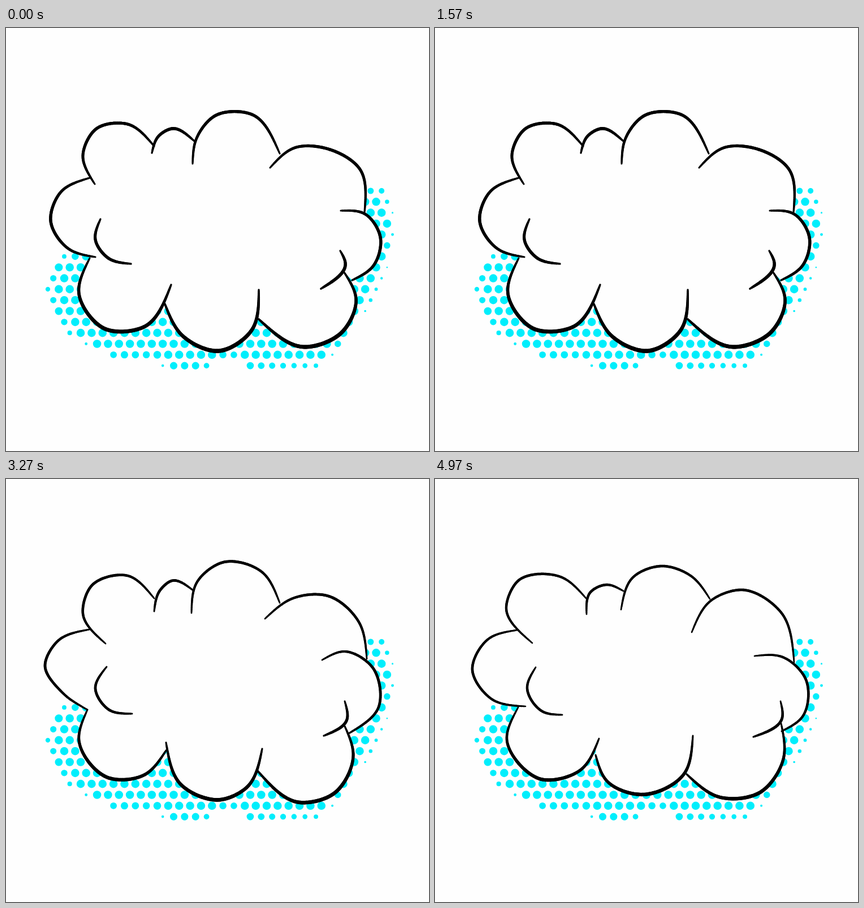
Recreate the animation shown at these times as an HTML page with a canvas. Size 748x748 px, loop 5060 ms.

```html
<!DOCTYPE html>
<html lang="en">
<head>
<meta charset="utf-8">
<title>Comic cloud</title>
<style>
  html, body { margin: 0; width: 100%; height: 100%; overflow: hidden; background: #fefefe; }
  canvas { display: block; width: 100vw; height: 100vh; }
</style>
</head>
<body>
<canvas id="stage" width="748" height="748"></canvas>
<script>
const ctx = document.getElementById('stage').getContext('2d');
const PAPER = '#fefefe', INK = '#000', CYAN = '#00eefc';
const LOOP = 5060, BLOCK = 1300, STEPS = 10;

// Lobes run clockwise from the top left, each through a few key points.
const POSES = [
  {
    pen: 5.4,
    lobes: [
      '157,276 136,225 160,178 215,170 262,209',
      '258,221 270,191 293,178 333,200',
      '330,240 337,195 370,155 435,153 484,222',
      '467,247 510,212 570,214 626,250 634,326',
      '592,323 635,329 662,370 650,420 612,446',
      '598,432 619,480 595,537 528,564 447,515',
      '447,463 434,535 377,571 313,545 281,488',
      '292,454 245,528 175,532 129,470 148,407',
      '158,405 110,390 79,341 97,290 148,265'
    ],
    creases: ['591,394 600,415 557,461', '167,338 158,374 181,407 221,417']
  },
  {
    pen: 4.8,
    lobes: [
      '176,291 136,238 152,188 215,171 262,211',
      '262,234 273,196 293,180 331,197',
      '328,237 338,182 385,147 452,164 484,219',
      '458,247 510,210 570,207 624,253 638,318',
      '559,320 598,305 648,333 659,403 606,450',
      '598,435 614,490 580,556 520,572 444,515',
      '453,477 425,546 380,567 310,541 283,466',
      '283,480 245,523 180,528 129,462 144,408',
      '144,408 100,378 69,330 91,287 148,266'
    ],
    creases: ['599,393 603,425 562,454', '178,332 158,370 182,408 223,415']
  },
  {
    pen: 4.6,
    lobes: [
      '172,290 126,228 147,180 222,173 268,212',
      '268,239 275,200 303,187 333,198',
      '329,231 350,174 400,154 452,171 486,212',
      '454,271 488,215 543,196 612,236 635,324',
      '565,313 615,315 656,355 650,420 613,446',
      '612,432 616,495 575,554 505,563 445,522',
      '456,454 440,522 365,558 304,534 284,488',
      '290,459 258,514 188,531 127,460 147,404',
      '160,402 100,389 66,337 93,284 146,267'
    ],
    creases: ['611,393 614,422 563,456', '178,333 163,370 190,411 225,417']
  }
].map(({ pen, lobes, creases }) => ({ pen, lobes: lobes.map(curve), creases: creases.map(curve) }));

const SHADOW = parsePoints(
  '630,278 670,278 686,320 688,368 676,425 652,481 600,560 556,604 424,609 ' +
  '400,588 375,590 355,609 284,609 262,589 190,590 106,544 82,506 66,462 88,400');

function parsePoints(text) {
  return text.split(' ').map(pair => pair.split(',').map(Number));
}

// Chord-length cubic spline: keeps round lobes round with few points.
function curve(text) {
  const points = parsePoints(text), last = points.length - 1;
  const gaps = points.slice(1).map((p, i) => Math.hypot(p[0] - points[i][0], p[1] - points[i][1]));
  const slope = (i, k) => (points[i + 1][k] - points[i][k]) / gaps[i];
  const tangents = points.map((_, i) => [0, 1].map(k => i > 0 && i < last
    ? (slope(i - 1, k) * gaps[i] + slope(i, k) * gaps[i - 1]) / (gaps[i - 1] + gaps[i]) : 0));
  for (const k of [0, 1]) {
    tangents[0][k] = 1.5 * slope(0, k) - 0.5 * tangents[1][k];
    tangents[last][k] = 1.5 * slope(last - 1, k) - 0.5 * tangents[last - 1][k];
  }
  const path = [points[0]];
  for (let i = 0; i < last; i++) {
    const count = Math.ceil(gaps[i] / 3);
    for (let n = 1; n <= count; n++) {
      const u = n / count, v = 1 - u;
      path.push([0, 1].map(k =>
        points[i][k] * (1 + 2 * u) * v * v + points[i + 1][k] * u * u * (3 - 2 * u) +
        gaps[i] * u * v * (tangents[i][k] * v - tangents[i + 1][k] * u)));
    }
  }
  return path;
}

function distanceToEdge(x, y, [ax, ay], [bx, by]) {
  const dx = bx - ax, dy = by - ay;
  const along = ((x - ax) * dx + (y - ay) * dy) / (dx * dx + dy * dy);
  const u = Math.min(1, Math.max(0, along));
  return Math.hypot(x - ax - u * dx, y - ay - u * dy);
}

// Staggered halftone whose dots shrink towards the rim of the shadow.
function makeHalftone() {
  const area = new Path2D(), dots = new Path2D();
  SHADOW.forEach(p => area.lineTo(...p));
  for (let row = 0; row < 17; row++) {
    const y = 288 + row * 19.32;
    for (let x = 64.3 + (row % 2) * 9.7; x < 700; x += 19.35) {
      if (!ctx.isPointInPath(area, x, y)) continue;
      const depth = Math.min(...SHADOW.map((p, i) =>
        distanceToEdge(x, y, p, SHADOW[(i + 1) % SHADOW.length])));
      const r = Math.min(7.3, depth * 0.55);
      if (r < 1.3) continue;
      dots.moveTo(x + r, y);
      dots.arc(x, y, r, 0, Math.PI * 2);
    }
  }
  return dots;
}
const halftone = makeHalftone();

// The pen tapers at both ends and presses harder towards the bottom.
function inkStroke(path, pen) {
  const last = path.length - 1;
  for (let i = 0; i < last; i++) {
    const swell = Math.sqrt(Math.sin(Math.PI * (i + 0.5) / last));
    const press = pen + 1.6 * Math.max(0, (path[i][1] - 400) / 150);
    ctx.lineWidth = press * (0.5 + 0.5 * swell);
    ctx.beginPath();
    ctx.moveTo(...path[i]);
    ctx.lineTo(...path[i + 1]);
    ctx.stroke();
  }
}

function drawScene({ pen, lobes, creases }) {
  ctx.fillStyle = PAPER;
  ctx.fillRect(0, 0, 748, 748);
  ctx.fillStyle = CYAN;
  ctx.fill(halftone);
  ctx.fillStyle = PAPER;
  ctx.beginPath();
  lobes.flat().forEach(p => ctx.lineTo(...p));
  ctx.fill();
  ctx.strokeStyle = INK;
  ctx.lineCap = 'round';
  [...lobes, ...creases].forEach(path => inkStroke(path, pen));
}

function poseAt(time) {
  const t = time % LOOP, local = t % BLOCK;
  let step = STEPS - 1;
  while (Math.round(step * 40 / 3) * 10 > local) step--;
  return (Math.floor(t / BLOCK) * STEPS + step) % POSES.length;
}

let shown = -1;
const start = performance.now();
function tick() {
  const index = poseAt(performance.now() - start);
  if (index !== shown) drawScene(POSES[shown = index]);
  requestAnimationFrame(tick);
}
tick();
</script>
</body>
</html>
```
